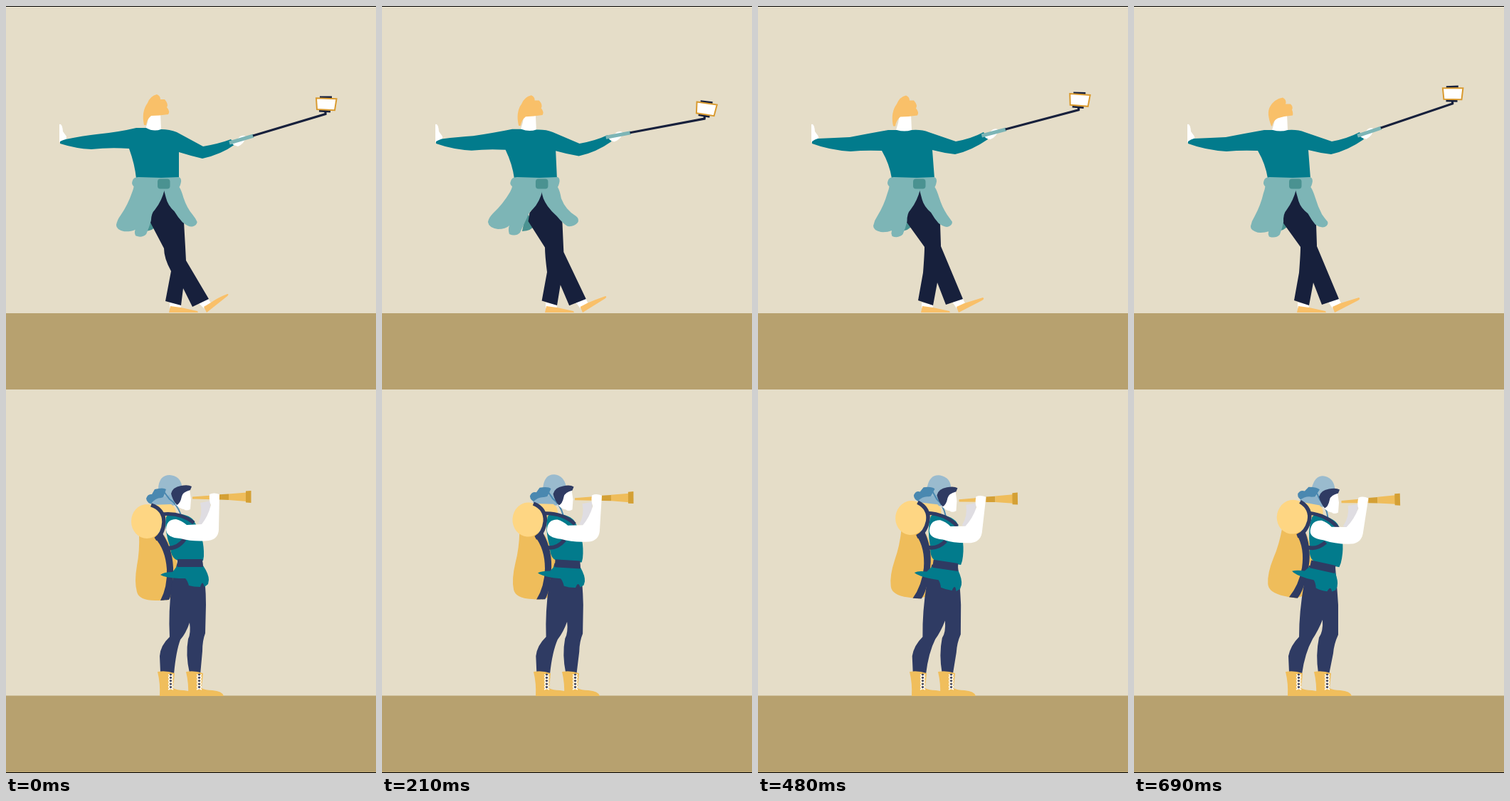
These frames come from a looping animation (520x1076 px, 0.72 s). An HTML page with a canvas:

```html
<!DOCTYPE html>
<html lang="en">
<head>
<meta charset="utf-8">
<title>Travellers</title>
<style>
html, body { margin: 0; width: 100%; height: 100%; overflow: hidden; background: #e5ddc8; }
canvas { display: block; width: 520px; height: 1076px; }
</style>
</head>
<body>
<canvas id="stage" width="520" height="1076"></canvas>
<script>
const ctx = document.getElementById('stage').getContext('2d');
const LOOP = 720, STEP = 30;
const TIMES = [0, 90, 210, 360, 480, 600, 690];
const DEG = Math.PI / 180;

const C = {
  sky: '#e5ddc8', ground: '#b7a16f', teal: '#027b8c', mist: '#7db5b6', knot: '#4a9291',
  ink: '#17203c', hair: '#f9c069', white: '#fff', frame: '#d99a2f',
  navy: '#2f3b63', pack: '#efbd5b', roll: '#fed683', boot: '#f0be5c', brass: '#d4a035',
  hat: '#9abbce', brim: '#8db3cb', bow: '#4a88b0', shade: '#dfdde2'
};

// Smooth value through one number per entry of TIMES
function keyed(t, v) {
  let i = 0;
  while (i < TIMES.length - 2 && t > TIMES[i + 1]) i++;
  const rate = j => (v[j + 1] - v[j]) / (TIMES[j + 1] - TIMES[j]);
  const slope = j => {
    if (j === 0) return rate(0);
    if (j === v.length - 1) return rate(j - 1);
    const a = rate(j - 1), b = rate(j);
    return a * b <= 0 ? 0 : 2 * a * b / (a + b);
  };
  const h = TIMES[i + 1] - TIMES[i];
  const x = Math.min(1, (t - TIMES[i]) / h), x2 = x * x, x3 = x2 * x;
  return v[i] * (2 * x3 - 3 * x2 + 1) + v[i + 1] * (3 * x2 - 2 * x3)
    + h * (slope(i) * (x3 - 2 * x2 + x) + slope(i + 1) * (x3 - x2));
}

// Blend two path strings that share one structure
function mix(a, b, k) {
  const num = /-?\d+(\.\d+)?/g, to = b.match(num);
  let i = 0;
  return a.replace(num, n => +n + (to[i++] - n) * k);
}

function fill(color, d) {
  ctx.fillStyle = color;
  ctx.fill(new Path2D(d));
}

function line(color, width, d) {
  ctx.strokeStyle = color;
  ctx.lineWidth = width;
  ctx.stroke(new Path2D(d));
}

function group(place, paint) {
  ctx.save();
  place();
  paint();
  ctx.restore();
}

function turn(x, y, deg, dx = 0, dy = 0) {
  ctx.translate(x + dx, y + dy);
  ctx.rotate(deg * DEG);
  ctx.translate(-x, -y);
}

const wave = t => 0.5 + 0.5 * Math.cos(2 * Math.PI * t / 240);

const HAIR = [
  'M197 167Q190 149 195 140Q201 129 213 127Q219 130 217 136L224 136Q228 140 226 144Q228 149 227 152Q214 153 206 156Q200 159 198 167Z',
  'M194 167Q190 148 199 136Q203 126 212 124Q217 126 217 131L223 131Q229 138 226 142Q231 148 228 152Q215 154 204 154Q198 159 197 167Z'
];
const SHIRT = [
  'M76 190Q80 188 84 187Q108 182 127 180Q158 177 183 171L197 171Q207 177 218 173Q230 173 240 177L277 197Q300 193 316 187L322 194Q303 208 276 214Q259 210 243 205L243 242L183 242Q181 222 173 200Q146 198 120 201Q98 200 76 193Z',
  'M76 190Q80 187 84 186Q108 185 129 184Q160 178 183 174L195 174Q206 177 216 174Q230 173 240 177L278 190Q300 186 317 177L323 187Q300 203 277 208Q260 206 245 202L248 242L188 242Q185 222 174 203Q150 202 130 204Q100 202 76 193Z'
];
const LEGS = [
  'M218 250Q214 280 204 290L202 302L222 340Q222 354 232 372L224 414L246 420L249 396L262 422L285 411L253 357L252 338L250 303Q248 280 240 262Z',
  'M223 250Q220 278 210 290L208 302L234 338Q234 348 232 374L225 413L246 420L252 388L264 419L288 411L257 337L257 335L256 306Q253 285 245 262Z'
];
const FLAP_L = [
  'M178 246Q179 240 187 240L219 241L223 257Q219 275 209 285Q203 290 201 297Q197 305 191 318Q185 324 176 320Q174 313 176 308Q171 313 160 313Q147 311 146 303Q147 297 153 291Q167 278 177 261Q180 255 180 253Q176 250 178 246Z',
  'M177 246Q178 240 185 240L219 241L223 257Q219 272 210 286Q205 292 207 306Q207 314 204 322Q198 328 189 325Q187 323 188 320Q181 321 173 320Q164 317 165 312Q167 303 170 297Q176 280 177 263Q179 256 179 253Q176 250 177 246Z'
];
const FLAP_R = [
  'M218 241L244 240Q248 242 246 249Q245 253 244 254Q247 259 249 270Q255 286 270 295Q275 299 272 304Q267 310 258 309Q252 306 243 295Q235 288 230 281Q222 270 221 257Z',
  'M217 241L242 240Q247 242 245 249Q244 253 243 254Q246 258 250 268Q253 280 254 291Q257 297 265 302Q269 306 266 310Q261 315 253 312Q249 306 244 296Q233 290 229 282Q222 270 221 257Z'
];

function selfie(t) {
  const lean = Math.min(1, t / 360);
  const swing = keyed(t, [.47, .25, 0, .16, .58, 1, .68]);
  const tuft = wave(Math.min(t, 600));

  // feet
  fill(C.white, 'M230 416L246 419L246 425L230 424Z');
  fill(C.hair, 'M229 430L231 421L246 423L269 428L270 430Z');
  fill(C.white, mix('M271 417L284 410L288 417L278 424Z', 'M273 415L287 409L291 417L279 424Z', lean));
  fill(C.hair, mix('M278 422L288 416Q298 409 311 404Q314 404 311 407L282 430Z',
    'M279 422L290 417Q303 413 316 409Q319 410 315 413L282 430Z', lean));

  group(() => ctx.translate(5 * lean, 0), () =>
    fill(C.knot, 'M200 288L211 308Q208 315 194 316Z'));
  fill(C.ink, mix(...LEGS, lean));

  // head
  group(() => ctx.translate(-2 * lean, lean), () =>
    fill(C.white, 'M201 151L217 151L218 173Q207 179 196 173L199 163Z'));

  fill(C.white, 'M75 166Q79 164 80 176L85 183L84 191L75 191Z');
  fill(C.teal, mix(...SHIRT, lean));
  group(() => ctx.translate(-4 * lean, 1.5 * lean), () => fill(C.hair, mix(...HAIR, tuft)));

  // tied jacket
  group(() => ctx.translate(5 * lean, 0), () => {
    fill(C.mist, mix(...FLAP_L, swing));
    fill(C.mist, mix(...FLAP_R, swing));
    ctx.fillStyle = C.knot;
    ctx.beginPath();
    ctx.roundRect(213, 242.5, 17.5, 14, 4);
    ctx.fill();
  });

  // stick and phone
  const x = keyed(t, [0, 1, 1, 1, 0.5, 0, 0]);
  const y = keyed(t, [0, -2.7, -6.3, -9, -9.6, -10.4, -10.4]);
  const angle = keyed(t, [0, 2.3, 6, 6, 1.8, -2, -2]);
  group(() => turn(328, 188, angle, x, y), () => {
    fill(C.white, 'M318 193L329 183Q336 180 337 184Q335 193 326 197L320 195Z');
    line(C.mist, 5, 'M314 192L348 182');
    line(C.ink, 3.2, 'M347 182L449 151.5L449 147');
    line(C.ink, 3, 'M441 128L458 128M440 147L456 148');
    const screen = 'M436 129.3L464.5 130.3L462 146.2L437 145Z';
    fill(C.white, screen);
    line(C.frame, 2, screen);
  });
}

const DOME = [
  'M226 678Q228 656 235 655Q243 655 253 673L245 690L222 700Z',
  'M214 677Q215 658 230 658Q244 659 247 672L240 692L222 700Z'
];
const BOW = [
  'M206 683Q210 679 219 679L224 673Q238 672 240 676L232 692L228 697Q224 700 220 697L213 693Q206 690 206 683Z',
  'M197 691Q199 684 205 685L209 678Q221 675 225 678L221 689L232 690Q224 699 214 699L207 699Q198 698 197 691Z'
];
const BRIM = [
  'M194 701Q208 691 220 690L238 688L242 700Q215 697 194 701Z',
  'M204 698Q210 690 218 690L236 684L238 700Q220 705 204 698Z'
];
const TAIL = [
  'M241 785L277 785Q283 795 281 801L279 802L276 801Q270 802 266 808Q256 813 248 810Q244 801 240 799L224 797Q218 793 222 789Q232 790 241 785Z',
  'M241 785L277 785Q285 797 285 805Q284 811 279 815L276 804Q273 815 264 815Q257 813 255 806Q252 803 243 803L223 802Q217 798 222 794Q234 794 241 785Z'
];
const TROUSERS = [
  'M241 780L276 780Q281 810 281 840L280 880Q276 890 276 905L273 938L258 936Q252 910 256 888Q260 880 258 865Q253 880 245 889Q239 905 236 937L217 935L216 912Q217 897 230 885Q228 850 233 810Z',
  'M246 785L283 788Q285 810 287 840L287 882Q281 895 280 908L274 938L259 936Q255 910 260 886Q266 878 265 861Q259 876 251 888Q240 908 236 937L218 935L217 912Q220 897 232 885Q232 850 239 810Z'
];

function boot(dx) {
  group(() => ctx.translate(dx, 0), () => {
    fill(C.boot, 'M213 934Q225 932 237 936L235 957Q240 960 250 960Q264 961 266 968L216 968Q217 950 213 934Z');
    for (let i = 0; i < 5; i++) {
      const y = 938 + i * 4.4;
      line(C.white, 1.4, `M228 ${y}L235 ${y + 3.4}M235 ${y}L228 ${y + 3.4}`);
      fill(C.navy, `M231.5 ${y - 1.8}l1.8 1.8l-1.8 1.8l-1.8 -1.8Z`);
    }
  });
}

function hiker(t) {
  const u = t / 690, puff = wave(t);
  const tilt = dx => () => turn(240, 836, 12.2 * u, dx * u);

  group(tilt(0), () => {
    // pack
    fill(C.pack, 'M222 742L240 772Q242 800 237 828L225 834L215 800Z');
    fill(C.pack, 'M187 740Q188 765 184 785Q180 808 184 822Q187 834 210 834L222 834Q232 800 226 765L218 740Z');
    fill(C.navy, 'M209 746L220 740Q236 765 235 795Q235 822 229 833L217 834Q227 815 226 790Q224 762 209 746Z');
    // hat
    fill(C.hat, mix(...DOME, puff));
    fill(C.bow, mix(...BOW, puff));
    fill(C.brim, mix(...BRIM, puff));
    line(C.bow, 2, mix('M228 681L236 690Q250 700 252 714', 'M220 679L230 692Q240 698 246 714', puff));
    // bedroll
    fill(C.roll, 'M203 700L232 699Q240 704 239 714L218 722Z');
    ctx.fillStyle = C.roll;
    ctx.beginPath();
    ctx.ellipse(198, 723, 22, 24, 0, 0, 7);
    ctx.fill();
    line(C.navy, 5.5, 'M204 700Q222 706 222 724Q221 741 210 748');
  });

  fill(C.navy, mix(...TROUSERS, u));

  group(tilt(-4.5), () => fill(C.teal, mix(...TAIL, puff)));
  group(tilt(0), () => {
    fill(C.teal, 'M225 717Q228 711 240 712Q261 714 265 724Q279 745 278 772L277 778L242 778Q232 775 231 760Q222 735 225 717Z');
    line(C.navy, 5, 'M219 713Q245 710 264 725');
    line(C.navy, 5.5, 'M223 760Q240 763 251 748');
  });
  group(tilt(-4.5), () => fill(C.navy, 'M241 776L276 776L277 787L241 787Z'));

  // head
  group(() => ctx.translate(28 * u, 4.5 * u * u), () => {
    fill(C.white, 'M244 682L258 678L260 692L259 706Q253 709 250 706Q245 706 238 699Z');
    fill(C.navy, 'M232 684Q234 675 246 673Q256 671 261 674L259 679Q248 682 247 688Q245 698 240 700Q234 693 232 684Z');
  });

  const arm = () => ctx.transform(1, .06 * u, -.135 * u, 1, 121.9 * u, -12.5 * u);
  group(arm, () => fill(C.shade, 'M273 697L287 694L287 708L278 729L270 726Q277 712 273 697Z'));

  // telescope
  group(() => turn(262, 690, -1.4 * u, 29.5 * u, 5.7 * u), () => {
    fill(C.pack, 'M262 688.4L300 685.8L300 692.5L262 691.6Z');
    fill(C.brass, 'M300 685.2L313 684.6L313 693L300 692.6Z');
    fill(C.pack, 'M313 684.4L338 682.5L338 695L313 693Z');
    fill(C.brass, 'M337 680.5L344.5 680L344.5 697L337 696.5Z');
  });

  group(arm, () =>
    fill(C.white, 'M225 735Q225 720 239 720Q247 722 254 728L275 727Q284 716 288 700Q285 694 286 685Q292 682 300 685L299 735Q298 748 285 750Q263 752 245 747Q226 746 225 735Z'));

  boot(0);
  boot(40);
}

function rect(color, y, h) {
  ctx.fillStyle = color;
  ctx.fillRect(0, y, 520, h);
}

function draw(t) {
  rect(C.sky, 0, 1076);
  rect(C.ground, 431, 107);
  rect(C.ground, 967.5, 108.5);
  selfie(t);
  hiker(t);
  rect('#000', 0, 1);
  rect('#000', 1075, 1);
}

const start = performance.now();
function tick() {
  const t = (performance.now() - start) % LOOP;
  draw(Math.floor(t / STEP) * STEP);
  requestAnimationFrame(tick);
}
tick();
</script>
</body>
</html>
```
